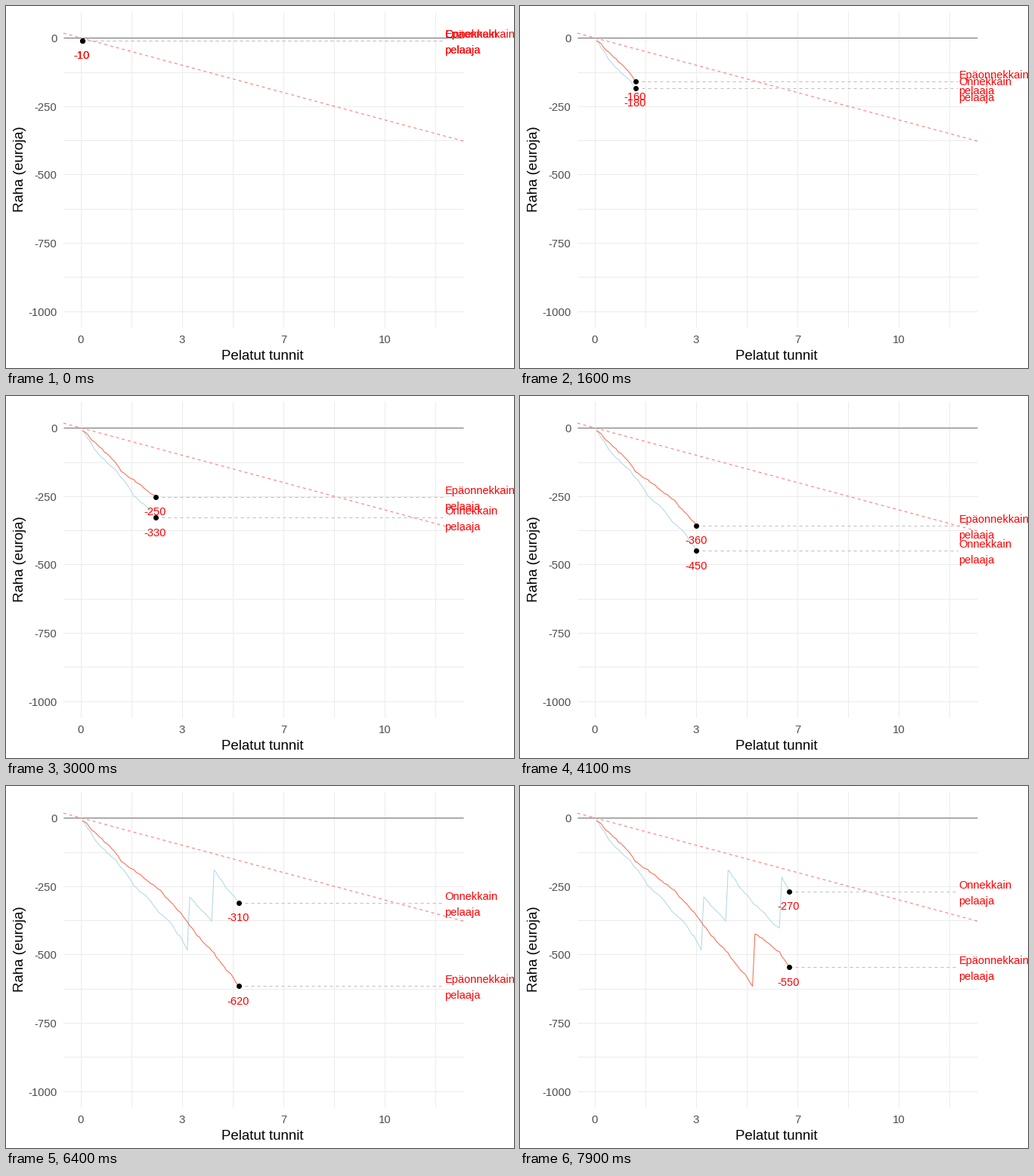
Write a matplotlib script that moves like this. It is 672 px wide and 480 px high and loops after 8 s.

```python
import numpy as np
import matplotlib.pyplot as plt
from matplotlib.animation import FuncAnimation

W, H, DPI = 672, 480, 96
FRAMES, INTERVAL = 80, 100
PX = 72 / DPI                                   # one pixel in points
LEFT, RIGHT, TOP, BOTTOM = 76, 605, 7, 426
X_END, X_NAME = 579, 580.5
PX_PER_HOUR, JACKPOT = 40.2, 200
DASH = (0, (4, 4))

plt.rcParams["font.family"] = "Liberation Sans"

fig = plt.figure(figsize=(W / DPI, H / DPI), dpi=DPI, facecolor="white")
ax = fig.add_axes([0, 0, 1, 1])
ax.set_xlim(0, W)
ax.set_ylim(H, 0)
ax.axis("off")


def hour_x(hours):
    return 99 + PX_PER_HOUR * hours


def euro_y(euros):
    return 42.25 - 0.3624 * euros


def line(xs, ys, color, z, style="-"):
    return ax.plot(xs, ys, color=color, lw=PX, ls=style, zorder=z,
                   solid_capstyle="butt", dash_capstyle="butt")[0]


def text(x, y, s, size, color, ha="center", **kw):
    return ax.text(x, y, s, fontsize=size, color=color, ha=ha, va="baseline",
                   zorder=9, **kw)


def draw_axes():
    for i in range(8):
        x = hour_x(i * 5 / 3)
        line([x, x], [TOP, BOTTOM], "#ebebeb", 0)
        if i % 2 == 0:
            text(x, 447, str(round(i * 5 / 3)), 11.2, "#4d4d4d")
    for euros in range(0, -1001, -125):
        y = euro_y(euros)
        line([LEFT, RIGHT], [y, y], "#ebebeb", 0)
        if euros % 250 == 0:
            text(67.5, y + 6, str(euros), 11.2, "#4d4d4d", ha="right")
    text(339.5, 469, "Pelatut tunnit", 14, "black")
    text(23, 216, "Raha (euroja)", 14, "black", rotation=90, rotation_mode="anchor")

    # Break-even level and expected loss of 30 euros an hour
    line([LEFT, RIGHT], [euro_y(0)] * 2, "#6b6b6b", 2)
    edges = np.array([LEFT, RIGHT])
    hours = (edges - hour_x(0)) / PX_PER_HOUR
    line(edges, euro_y(-30 * hours), "#ff7070", 3, DASH)


def spending(keys, rng):
    """Total stakes per step, shared out at random between the key points."""
    total = [keys[0][1]]
    for (a, start), (b, end) in zip(keys, keys[1:]):
        share = np.cumsum(rng.uniform(0.4, 1.6, b - a))
        total.extend(start + (end - start) * share / share[-1])
    return np.array(total)


class Player:
    def __init__(self, name, keys, wins, color, z, seed):
        steps = np.arange(FRAMES)
        won = JACKPOT * sum((steps >= w).astype(int) for w in wins)
        self.money = won - spending(keys, np.random.default_rng(seed))
        self.xs = 101 + 3.228 * steps
        self.ys = euro_y(self.money)
        self.path = line([], [], color, z)
        self.guide = line([], [], "#bebebe", 6, DASH)
        self.dot = ax.plot([], [], "o", color="black", ms=7 * PX, mew=0, zorder=8)[0]
        self.value = text(0, 0, "", 11, "red")
        self.names = [text(X_NAME, 0, s, 11, "red", ha="left")
                      for s in (name, "pelaaja")]

    def show(self, i):
        x, y = self.xs[i], self.ys[i]
        self.path.set_data(self.xs[:i + 1], self.ys[:i + 1])
        self.guide.set_data([x, X_END], [y, y])
        self.dot.set_data([x], [y])
        self.value.set_text(str(int(round(self.money[i] / 10) * 10)))
        self.value.set_position((x - 0.5, y + 24.5))
        for label, dy in zip(self.names, (-4, 17)):
            label.set_y(y + dy)


draw_axes()

# Key points are (step, euros staked so far); wins are the jackpot steps
players = [
    Player("Epäonnekkain",
           [(0, 10), (16, 160), (30, 252), (41, 357), (54, 494), (64, 616),
            (75, 689), (79, 746)],
           [65], "tomato", 5, seed=3),
    Player("Onnekkain",
           [(0, 10), (16, 183), (30, 329), (43, 484), (54, 591), (64, 710),
            (75, 803), (79, 869)],
           [44, 54, 76], "lightblue", 4, seed=8),
]


def update(i):
    for player in players:
        player.show(i)
    return []


anim = FuncAnimation(fig, update, frames=FRAMES, interval=INTERVAL,
                     repeat=True, repeat_delay=0, blit=False)
plt.show()
```
